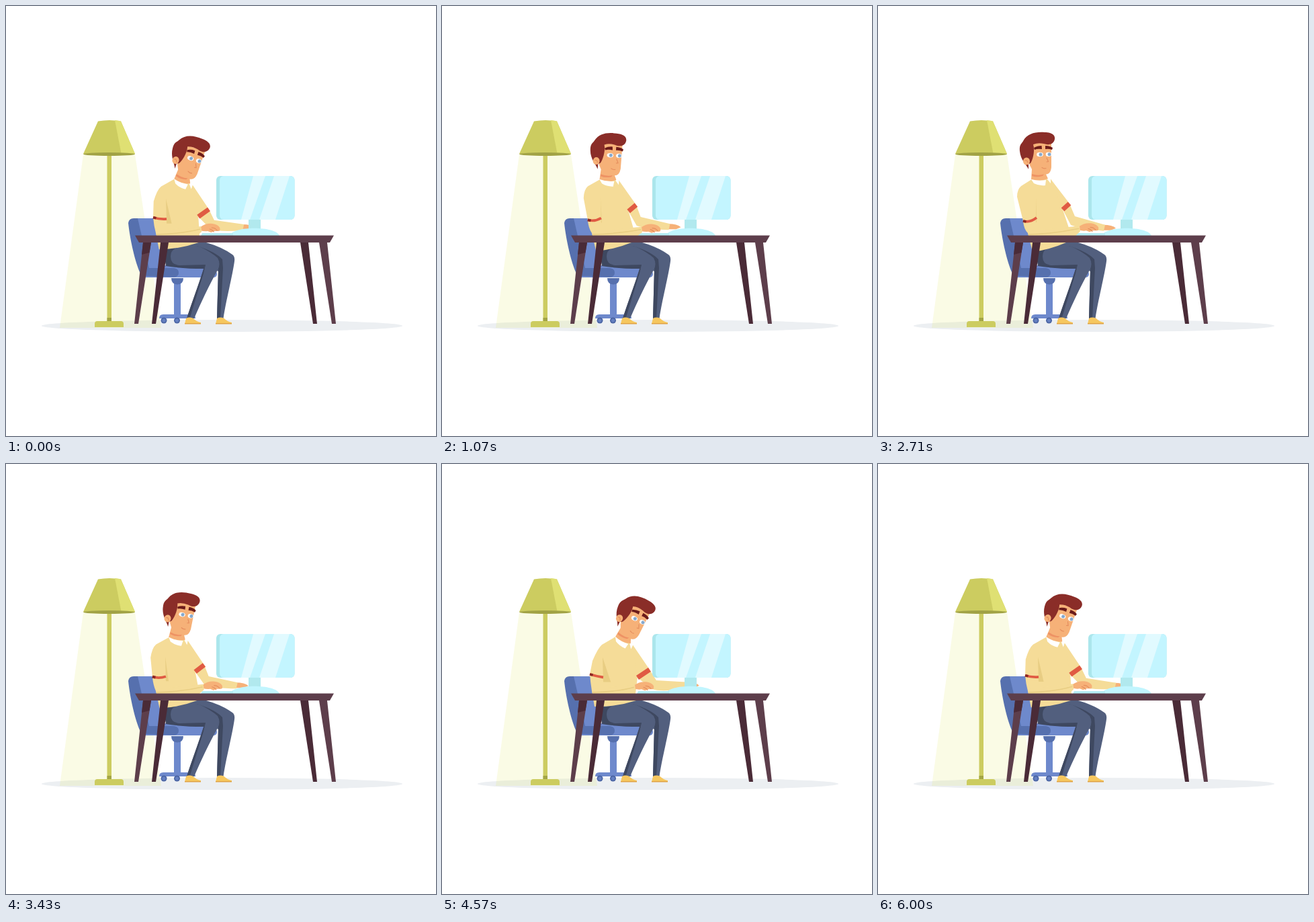
An HTML page that plays this animation: 640 px wide and 640 px high, repeating every 6070 ms.

```html
<!DOCTYPE html>
<html lang="en">
<head>
<meta charset="utf-8">
<title>Working at a desk</title>
<style>
  html, body { margin: 0; width: 100%; height: 100%; overflow: hidden; background: #fff; }
  svg { display: block; width: 100vw; height: 100vh; }
  .sweater { fill: #f5dc98; }
  .fold { fill: #e8cd83; }
  .skin { fill: #f6b178; }
  .hair { fill: #8a2d28; }
  .red { stroke: #e05b43; fill: none; }
  .maroon { stroke: #8a2823; fill: none; }
  .blue { fill: #6e89cc; }
  .navy { fill: #5670ae; }
  .pants { fill: #525f7e; }
  .shade { fill: #3e4860; }
  .wood { fill: #5d3e4b; }
  .dark { fill: #4a2b37; }
  .lamp { fill: #cccc60; }
  .line { fill: none; stroke: #e58e5e; stroke-width: 1.2; stroke-linecap: round; }
</style>
</head>
<body>
<svg viewBox="0 0 640 640">
  <defs>
    <g id="shoe">
      <path d="M266 473L268 465Q272 462.500 278 464.500Q284 470 290 471V473Z" fill="#f6c75f"/>
      <path d="M266 472H290V473.500H266Z" fill="#dfa244"/>
    </g>
    <g id="wheel"><circle r="4.500" fill="#4c66a5"/><circle r="2.600" fill="#6580c2"/></g>
  </defs>

  <ellipse cx="321.500" cy="476" rx="268.500" ry="9" fill="#eceff2"/>

  <!-- floor lamp -->
  <path d="M115 221H192L231 479H80Z" fill="#dfe35a" opacity=".155"/>
  <path class="lamp" d="M150.500 222H157V470H150.500ZM132 478V473Q132 469 136 469H171Q175 469 175 473V478Z"/>
  <path fill="#a3a545" d="M150.500 464H157V469H150.500Z"/>
  <path class="lamp" d="M137 171.500Q154 168.500 171 171.500L192 220Q153 225 115 220Z"/>
  <path fill="#dfe073" d="M162 170Q167 170.300 171 171.500L192 220L172 222Z"/>
  <ellipse cx="153.500" cy="220.500" rx="38.500" ry="2.500" fill="#a1a245"/>

  <!-- chair -->
  <path class="blue" d="M250 412H260V462H250ZM228 465Q228 459 234 459H276Q282 459 282 465Z"/>
  <path class="navy" d="M246 405H264Q264 414 255 414.500Q246 414 246 405Z"/>
  <use href="#wheel" x="235" y="468"/><use href="#wheel" x="254.500" y="468"/>
  <path class="blue" d="M190 316H236V386H296V393H309Q314 394 314 399T308 404H206Z"/>
  <path class="navy" d="M182 323Q183 316 190 316H196L213 390H250Q257 391 257 397T250 403.500L208 402Q201 401 199 396C190 374 184 342 182 323Z"/>

  <!-- legs -->
  <path class="pants" d="M250 352H298Q322 359 337 370Q341 373 340 380C337 402 328 436 323.500 465H314L316 395Z"/>
  <path class="shade" d="M284 357Q312 366 322 377L323 390L319 465H314L316 390Z"/>
  <path class="pants" d="M232 362Q262 352 288 358Q305 366 315 375Q320 384 315 393C303 414 290 442 280 465H269C277 440 287 414 295 390L262 389Q242 389 236 380Z"/>
  <path class="shade" d="M234 362L252 361Q245 364 245 373Q245 385 258 386L297 385L294 398L274 463L269 465C277 440 287 414 294 391Q262 391 238 387Z"/>
  <use href="#shoe"/><use href="#shoe" x="46"/>

  <!-- far arm -->
  <path id="farHand" class="skin"/>
  <path id="farArm" class="sweater"/>

  <!-- monitor and keyboard -->
  <rect x="361" y="317" width="18" height="17" fill="#b1e9ee"/>
  <rect x="313" y="253" width="116.500" height="65" rx="6" fill="#abe6ec"/>
  <rect x="318" y="253" width="111.500" height="65" rx="6" fill="#c3f5ff"/>
  <path d="M368 253H386L363 318H350ZM399 253H422L401 318H377Z" fill="#e1faff"/>
  <path d="M333 342C337 327 402 327 407 342Z" fill="#c1f5fe"/>
  <path d="M292 338H338V342H290Z" fill="#b4ecf3"/>

  <!-- body -->
  <path id="torso" class="sweater"/>
  <path id="fold" class="fold"/>
  <path id="nearHand" class="skin"/>
  <path id="fingers" class="line"/>
  <path id="forearm" class="sweater"/>
  <path id="crease" fill="none" stroke="#e8cd83" stroke-width="1.500"/>
  <path id="farBand" class="red" stroke-width="7"/>
  <path id="nearBand" class="red" stroke-width="3.800"/>
  <path id="nearBandEnd" class="maroon" stroke-width="3.800"/>

  <g id="head">
    <path class="skin" d="M229 204H258V240Q257 250 250 250.500L253 257Q240 262 228 258L229 243L225 235Z"/>
    <path fill="#ee9264" d="M229 250Q238 253 247 250.500L245 253Q236 255.500 229 253Z"/>
    <path class="hair" d="M224 243C221 236 212 229 211 216C210 206 214 205 216 201C222 190 234 187 248 188C258 188 264 192 263 198C262 205 255 208 247 205Q238 203 231 206C234 216 230 230 227 234L224 235Z"/>
    <ellipse class="skin" cx="221" cy="231" rx="5" ry="5.500"/>
    <path class="line" d="M219 230Q222 229 223 233M251 226L253.500 231.500L251 232M244 240.500Q247 242.500 250 241.500"/>
    <g fill="#fff"><ellipse cx="241" cy="221" rx="4.800" ry="3.200"/><ellipse cx="254" cy="220.700" rx="4.300" ry="3.200"/></g>
    <g fill="#86a9ce"><circle cx="242" cy="221" r="2.500"/><circle cx="255" cy="220.700" r="2.500"/></g>
    <path d="M232 211Q237 208 243.500 208L244 213Q237 212 233 214ZM249 208Q256 208 260 211L259 214Q254 212 249 213Z" fill="#6c1b1a"/>
    <path d="M228 258L232 264Q240 268 249 267L250 259Q239 261 228 258ZM252 258L257 264L257 257L254 255Z" fill="#fff"/>
  </g>

  <!-- desk -->
  <path class="dark" d="M230 352H242L223 473H217ZM438 352H450L463 473H457Z"/>
  <path class="wood" d="M204 352H216L197 473H191ZM466 352H478L491 473H485Z"/>
  <path class="dark" d="M204 352H216L213.500 367L202 370Z"/>
  <path class="wood" d="M192 341.400H488L482 352H198Z"/>
</svg>
<script>
const LOOP = 6070, BACK = 2700, FRONT = 4200, SETTLE = 4500, REST = .75;
const $ = id => document.getElementById(id);
const draw = (id, d) => $(id).setAttribute('d', d);
const smooth = u => (u = Math.min(1, Math.max(0, u)), u * u * (3 - 2 * u));

// How far he leans: 0 is fully back, 1 is bent over the desk
function leanAt(t) {
  if (t < BACK) return REST * (1 - t / BACK) ** 2.4;
  if (t < SETTLE) return smooth((t - BACK) / (FRONT - BACK));
  return 1 - (1 - REST) * smooth((t - SETTLE) / (6000 - SETTLE));
}

function render(t) {
  const lean = leanAt(t);
  const tap = Math.sin(t / LOOP * Math.PI * 48) * .7;
  // A joint on its way from the leaning-back place to the bent-over place
  const joint = (x0, y0, x1, y1, bend = 1) =>
    [x0 + (x1 - x0) * lean ** bend, y0 + (y1 - y0) * lean ** bend];

  const neck = joint(240, 256.5, 269.5, 261);
  const shoulder = joint(210, 270, 235, 271, 1.2);
  const side = joint(207, 284, 224, 293);
  const band = [joint(216, 320, 220, 313), joint(236, 315, 240, 317.500)];
  const farBand = [joint(275, 303, 291, 318, 1.2), joint(285, 294, 309, 306, 1.2)];
  const elbow = joint(293, 313, 319, 322, 1.5);
  const [wx, wy] = joint(338, 328 - tap, 367, 328 - tap, 2);
  const [nx, ny] = joint(300, 331 + tap, 287, 331 + tap);
  const hem = joint(230, 366, 227, 361), hemEnd = joint(280, 352, 289, 352);

  const tilt = 27 * lean ** 1.2, r = tilt * Math.PI / 180;
  const onNeck = (x, y) =>
    [neck[0] + x * Math.cos(r) - y * Math.sin(r), neck[1] + x * Math.sin(r) + y * Math.cos(r)];
  const left = onNeck(-12, 2), right = onNeck(17, 1);
  $('head').setAttribute('transform', `translate(${neck}) rotate(${tilt}) translate(-240 -256.5)`);

  draw('farHand', `M${wx - 3} ${wy - 3}q14 0 19 5l-7 3h-12Z`);
  draw('farArm', `M${right}L${farBand[1]}L${elbow}L${wx} ${wy - 3}l-2 9
    Q${elbow[0] + 8} ${elbow[1] + 18} ${elbow[0] - 6} ${elbow[1] + 13}L${farBand[0]}L${left}Z`);
  draw('torso', `M${left}L${shoulder[0] + 3} ${shoulder[1] - 2}Q${shoulder[0] - 3} ${shoulder[1] + 3} ${side}
    L${band[0]}Q${band[0][0] + 1} ${band[0][1] + 12} 223 338L${hem}Q258 362 ${hemEnd}L288 342L${farBand[0]}L${right}Z`);
  draw('fold', `M${band[1][0] - 1} ${band[1][1] - 30}l${tilt * .45} 37h${1 - tilt * .45}Z`);
  draw('nearHand', `M${nx - 1} ${ny - 2}q8 -6 18 -5q8 1 11 6q1 5 -2 5h-6l-5 2l-5 -2q-5 1 -11 -1Z`);
  draw('fingers', `M${nx + 16} ${ny - 1}q5 0 8 4m-11 -2q4 1 6 4`);
  draw('forearm', `M223 335L${nx} ${ny - 3}l1 8L${nx - 6} 342H224Z`);
  draw('crease', `M224 340Q262 339 ${nx - 1} ${ny + 1}`);
  draw('farBand', `M${farBand[0]}L${farBand[1]}`);
  draw('nearBand', `M${band[0]}q10 3 ${band[1][0] - band[0][0]} ${band[1][1] - band[0][1]}`);
  draw('nearBandEnd', `M${band[0]}l4.500 1`);
}

const start = performance.now();
function frame() {
  render((performance.now() - start) % LOOP);
  requestAnimationFrame(frame);
}
frame();
</script>
</body>
</html>
```
